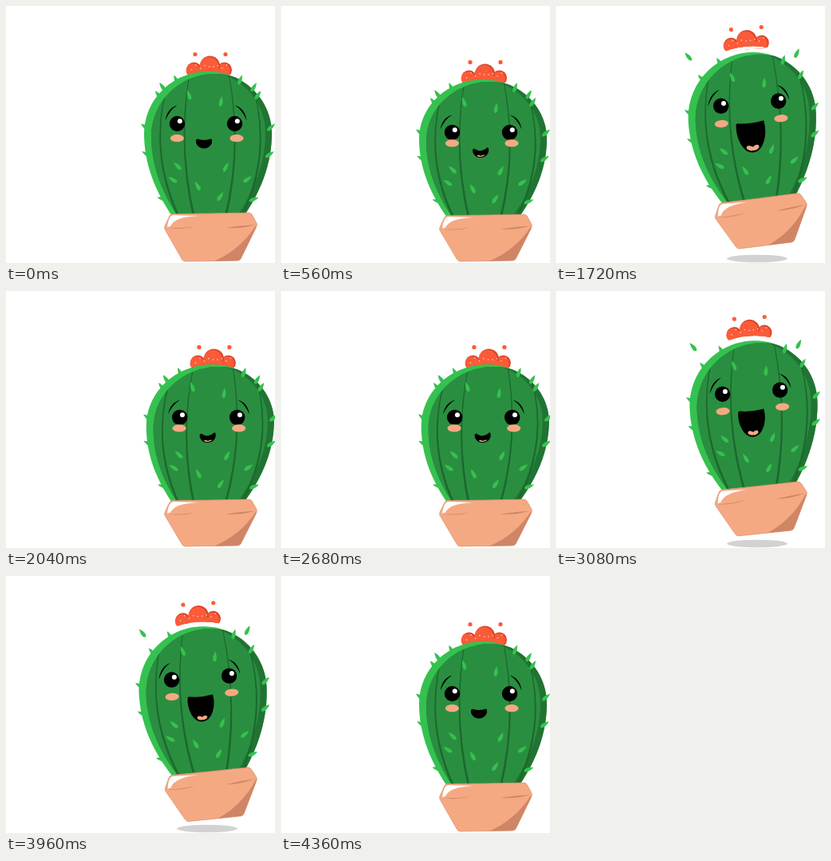
Animation, 337 px wide and 322 px high, one loop 4.44 s. Source, as an HTML page with a canvas:

```html
<!DOCTYPE html>
<html lang="en">
<head>
<meta charset="utf-8">
<title>Jumping cactus</title>
<style>
html, body { margin: 0; width: 100%; height: 100%; overflow: hidden; background: #fff; }
canvas { display: block; width: 337px; height: 322px; }
</style>
</head>
<body>
<canvas></canvas>
<script>
const LOOP = 4440, W = 337, H = 322;
const canvas = document.querySelector('canvas');
const dpr = window.devicePixelRatio || 1;
canvas.width = W * dpr;
canvas.height = H * dpr;
const c = canvas.getContext('2d');

const BODY = '#2a8e40', LIGHT = '#35c14f', SHADE = '#217333', LINE = '#1b692d';
const CLAY = '#f4a983', CLAY_DARK = '#cf8666', RED = '#fb5b38', RED_DARK = '#dc452b';
const MID = 253, TOP = 82, BASE = 266, SIDES = [-1, 1];

// Each pulse: start, full, release, end (ms)
const SQUASHES = [[80, 560, 650, 740], [1900, 2000, 2080, 2360], [2360, 2640, 2930, 3020], [4100, 4180, 4200, 4360]];
const JUMPS = [[660, 1080, 1460, 1920], [2940, 3360, 3640, 4110]];

let squash, air, lean;

const smooth = p => p * p * (3 - 2 * p);
const ballistic = p => 1 - (1 - p) ** 2;

function pulse(pulses, t, ease) {
  const now = pulses.find(p => t >= p[0] && t < p[3]);
  if (!now) return 0;
  const [start, full, release, end] = now;
  return ease(Math.min(1, (t - start) / (full - start), (end - t) / (end - release)));
}

// Bends a point of the resting plant into the current pose
function warp(x, y) {
  const u = x - 256, v = 260 - y, h = v / 178;
  return [
    x + lean * 5 * h + air * (0.5 - 0.087 * v - 16 * h * (1 - h)),
    y + squash * (2 + 0.045 * v) - air * (29 + 0.036 * v + 0.125 * u * (1 - 0.6 * h))
  ];
}

// The face tilts more than the skin around it and sinks when squashed
function faceWarp(x, y) {
  const [px, py] = warp(x, y);
  return [px, py + 3.8 * squash - air * 0.05 * (x - 256)];
}

// First pair moves; then 2 numbers = line, 4 = quadratic, 6 = cubic
function fill(color, parts, map = (x, y) => [x, y]) {
  c.beginPath();
  parts.forEach((part, i) => {
    const p = [];
    for (let k = 0; k < part.length; k += 2) p.push(...map(part[k], part[k + 1]));
    if (!i) c.moveTo(...p);
    else if (p.length === 2) c.lineTo(...p);
    else if (p.length === 4) c.quadraticCurveTo(...p);
    else c.bezierCurveTo(...p);
  });
  c.fillStyle = color;
  c.fill();
}

function oval(color, x, y, rx, ry = rx, turn = 0) {
  c.beginPath();
  c.ellipse(x, y, rx, ry, turn, 0, 7);
  c.fillStyle = color;
  c.fill();
}

// Round above the belly, tapering below it
function halfWidth(y) {
  const d = (y - 160) / 78;
  return 80 * (d < 0 ? Math.sqrt(Math.max(0, 1 - d * d)) : 1 - 0.25 * d * d);
}

function fillEgg(color, dx = 0, dy = 0) {
  c.beginPath();
  for (let i = -40; i <= 40; i++) {
    const y = TOP + (BASE - TOP) * (i / 40) ** 2;
    c.lineTo(...warp(MID + Math.sign(i) * halfWidth(y) + dx, y + dy));
  }
  c.fillStyle = color;
  c.fill();
}

function drawFlower() {
  const [x, y] = warp(254.5, 85);
  c.save();
  c.translate(x - 10.5 * air, y - 12.5 * air);
  c.rotate(-0.12 * air);
  for (const side of SIDES) oval(RED, 1.5 + side * 19, -24.5, 2.6);
  c.beginPath();
  c.rect(-40, -40, 80, 42);
  c.moveTo(28, 2);
  c.quadraticCurveTo(0, -6, -28, 2);
  c.clip('evenodd');
  for (const [lx, ly, r] of [[-19, -5, 9.5], [19, -5, 9.5], [1, -10, 12.5]]) {
    oval(RED_DARK, lx, ly, r);
    oval(RED, lx - 1.2, ly + 0.8, r - 0.8);
  }
  c.fillStyle = RED;
  c.fillRect(-24, -7, 48, 9);
  for (let i = 0; i < 9; i++)
    oval('#ffd9c4', -22 + i * 5.5, -5 - 6 * Math.abs(Math.sin(i * 1.4)), 0.8);
  c.restore();
}

function drawBody() {
  c.save();
  fillEgg(LIGHT);
  c.clip();
  fillEgg(SHADE, 9, 3);
  c.clip();
  fillEgg(BODY, -8, -1);
  // Ribs bow outwards and thicken towards the pot
  for (const k of [-0.76, -0.38, 0.41, 0.81]) {
    const [top, bow, foot] = [60, 105, 49].map(r => MID + k * r);
    fill(LINE, [[top, TOP - 2], [bow, 175, foot, BASE], [foot + 3, BASE], [bow + 2, 175, top + 1, TOP - 2]], warp);
  }
  c.restore();
}

function drawSpine(x, y, dx = 0, dy = 0) {
  const [px, py] = warp(x, y);
  c.save();
  c.translate(px + dx * air, py + dy * air);
  c.rotate(Math.atan2(y / 2 - 140, x - MID) - 0.13 * air);
  fill(LIGHT, [[-6, 0.8], [-5, -3, 1, -2.6, 7, 0], [2, 2.8, -4, 4, -6, 0.8]]);
  c.restore();
}

function drawSpines() {
  for (const [x, y] of [[229, 112], [269, 120], [215, 201], [275, 202], [209, 218], [302, 217], [240, 226], [268, 239]])
    drawSpine(x, y);
  for (const side of SIDES) {
    for (const y of [93, 112, 152, 186, 242]) drawSpine(MID + side * (halfWidth(y) - 1), y);
    // This pair pops off during a jump
    drawSpine(MID + side * 57, 102, 16 * side - 16, -25);
  }
}

function drawMouth() {
  const w = 8.8 + 11.5 * air, d = 10 + 39 * air, sag = 3 + 4 * squash * (1 - air);
  const [x, y] = faceWarp(248, 167.5 + 1.5 * squash);
  c.save();
  c.translate(x + 3 * air + 2 * squash, y);
  c.rotate(-0.17 * air - 0.06 * squash);
  fill('#000', [[-w, 0], [0, sag, w, 0], [w * 1.15, d * 0.45, w * 0.75, d, 0, d], [-w * 0.75, d, -w * 1.15, d * 0.45, -w, 0]]);
  c.lineJoin = 'round';
  c.lineWidth = 2;
  c.stroke();
  const tongue = Math.max(air, 0.45 * squash);
  c.clip();
  if (tongue > 0.05)
    for (const side of SIDES)
      oval(CLAY, side * 5 * tongue, d - 7 * air, 7 * tongue, 4.3 * tongue, -0.4 * side);
  c.restore();
}

function drawFace() {
  for (const side of SIDES) {
    const at = (dx, y) => faceWarp(250.6 + side * dx - 2 * air, y);
    fill('#000', [[51, 143.5], [48.5, 128, 36.2, 124.5], [45.5, 130, 51, 143.5]], at);
    const [x, y] = faceWarp(250.5 + side * 36, 147.5);
    oval('#000', x, y - 5 * air, 9.7);
    oval('#fff', x + 3.3, y - 3.2 - 5 * air, 3);
    const [cx, cy] = faceWarp(251.7 + side * 37.3, 165.7);
    oval(CLAY, cx, cy - 5 * squash * (1 - air) + 1.2 * squash, 8.6, 4.6, -0.13 * air);
  }
  drawMouth();
}

function drawPot() {
  c.save();
  c.translate(257 + 2.7 * air, 319 - 28.5 * air);
  c.translate(0, -30);
  c.rotate(-0.163 * air);
  c.translate(0, 30);
  c.scale(1, 1 - squash * 0.034);
  c.translate(-257, -319);
  c.beginPath();
  c.moveTo(256, 260);
  for (const [x, y, nx, ny] of [[307, 259, 315, 274], [315, 274, 293, 319], [293, 319, 222, 320],
    [222, 320, 198, 278], [198, 278, 206, 260.5], [206, 260.5, 256, 260]])
    c.arcTo(x, y, nx, ny, 5);
  c.closePath();
  c.fillStyle = CLAY;
  c.fill();
  c.strokeStyle = '#dc9472';
  c.lineWidth = 0.8;
  c.stroke();
  c.clip();
  fill(CLAY_DARK, [[255, 322], [292, 308, 313, 275], [320, 325]]);
  fill('#fff', [[202, 277], [204, 262, 210, 262], [241, 263], [211, 264, 206, 276]]);
  fill(CLAY_DARK, [[201, 278], [220, 279, 238, 276], [220, 281, 201, 278]]);
  fill(CLAY_DARK, [[275, 278], [294, 275, 312, 274], [294, 279.5, 275, 278]]);
  c.restore();
}

function draw(now) {
  const t = now % LOOP;
  squash = pulse(SQUASHES, t, smooth);
  air = pulse(JUMPS, t, ballistic);
  lean = t > 1300 && t < 3500 ? 1 - air : 0;
  c.setTransform(dpr, 0, 0, dpr, 0, 0);
  c.fillStyle = '#fff';
  c.fillRect(0, 0, W, H);
  c.globalAlpha = Math.min(1, air * 4);
  oval('#d2d2d2', 252, 316.5, 38, 4.8);
  c.globalAlpha = 1;
  drawFlower();
  drawBody();
  drawSpines();
  drawFace();
  drawPot();
}

const start = performance.now();
function tick() {
  draw(performance.now() - start);
  requestAnimationFrame(tick);
}
tick();
</script>
</body>
</html>
```
